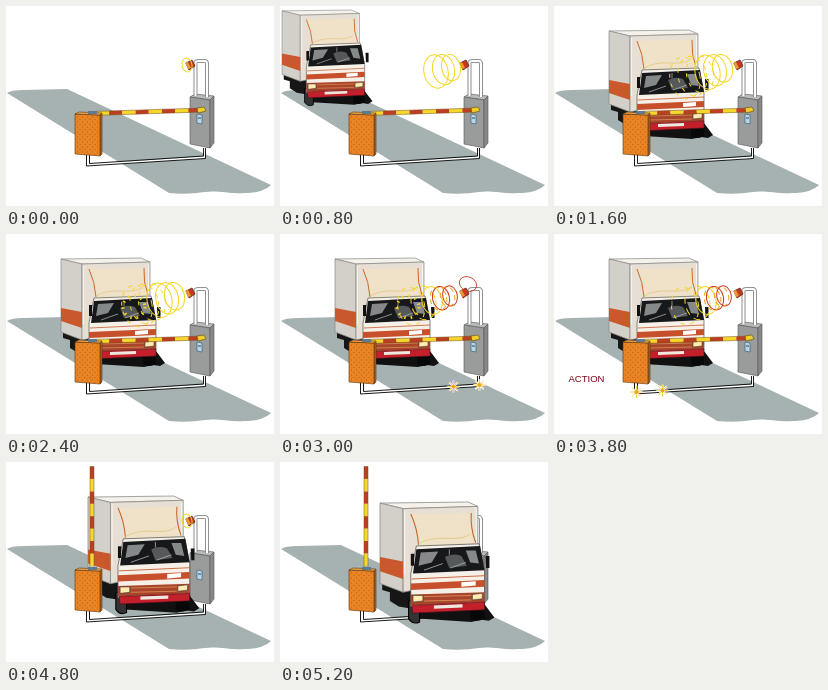
Recreate the animation shown at these times as an HTML page. Size 268 by 200 pixels, loop 5.4 s.

```html
<!DOCTYPE html>
<html lang="en">
<head>
<meta charset="utf-8">
<title>Vehicle barrier</title>
<style>
  html, body { margin: 0; width: 100%; height: 100%; overflow: hidden; background: #fff; }
  svg { display: block; width: 100vw; height: 100vh; }
  text { font-family: "Liberation Sans", Arial, sans-serif; }
</style>
</head>
<body>
<svg viewBox="0 0 268 200">
  <defs>
    <pattern id="speckle" width="5" height="5" patternUnits="userSpaceOnUse">
      <rect width="5" height="5" fill="#e88424"/>
      <path d="M1 1h1M3.5 3.5h1" stroke="#b85c18"/>
    </pattern>
  </defs>

  <path fill="#a6b1b1" d="M1 87Q5 84 18 84L61 83 265 179Q258 186 242 187C222 188 211 184 199 186Q181 189 163 187Z"/>

  <g fill="none" stroke="#000" stroke-width=".9">
    <path stroke="#fff" stroke-width="2" d="M82 148V159L198.500 151.500V142"/>
    <path d="M80.500 148V160L199.500 152.500V142M83.500 148V157.500L197.500 150V142"/>
  </g>

  <g id="station">
    <path fill="#b9bbba" stroke="#555" stroke-width=".6" d="M184 91L189 88 208 90 204 94Z"/>
    <path fill="#999c9b" stroke="#555" stroke-width=".6" d="M184 91L204 94V142L184 138Z"/>
    <path fill="#868988" stroke="#555" stroke-width=".6" d="M204 94L208 90V137L204 142Z"/>
    <path fill="#b8d8e8" stroke="#46647c" stroke-width=".7" d="M191 108L196 109V118L191 117Z"/>
    <path stroke="#284878" d="M192 112h3"/>
    <path id="post" fill="none" stroke="#8a8e90" stroke-width="3.600" d="M189.500 90V56Q190 55 192 55H199Q201 55 201 58V91"/>
    <use href="#post" style="stroke:#fff"/>
    <path fill="none" stroke="#fff" stroke-width="2" d="M189.500 90V56Q190 55 192 55H199Q201 55 201 58V91"/>
    <path fill="#c83a20" stroke="#5c2014" stroke-width=".8" d="M180 57L186 54 189 60 183 64Z"/>
    <path fill="#e59a3a" d="M179 57L182 56 185 62 182 63Z"/>
  </g>

  <g id="truck">
    <!-- ground shadow and wheels -->
    <path fill="#111" d="M84 119L150 117 159 129 154 132 147 131 138 133 90 130Z"/>
    <path fill="#161616" d="M57 96L84 101V121L72 119 64 114V106L57 104Z"/>
    <path fill="#333" stroke="#000" d="M81 114H91V133Q85 136 81 130Z"/>
    <path fill="#080808" d="M137 115H150V130Q143 134 137 130Z"/>
    <!-- cargo box -->
    <path fill="#f5f2eb" stroke="#888" stroke-width=".7" d="M55 25L135 24 144 28 76 30Z"/>
    <path fill="#d3d0ca" stroke="#888" stroke-width=".7" d="M55 25L76 30V106L55 98Z"/>
    <path fill="#e7dfd3" stroke="#888" stroke-width=".7" d="M76 30L144 28V92L76 106Z"/>
    <path fill="none" stroke="#f6f4ef" d="M77.500 32V90M142.500 30V64"/>
    <path fill="#c9582d" d="M55 74L76 78V94L55 87Z"/>
    <!-- wind deflector -->
    <path fill="#efe2c8" d="M83 35Q89 48 90 64L142 62Q137 48 138 34Z"/>
    <path fill="none" stroke="#c9682c" d="M83 35Q89 48 90 63M138 34Q137 48 142 61"/>
    <path fill="none" stroke="#e2c47a" stroke-width=".7" d="M90 62Q100 56 116 57T137 53"/>
    <!-- cab -->
    <path fill="#f5f1e9" stroke="#555" stroke-width=".7" d="M88 64L145 62 150 87V116L83 119V89Z"/>
    <path fill="#17181a" d="M88 67L146 64 150 86 85 89Z"/>
    <path fill="#85898a" d="M92 70L108 69 102 79 90 82ZM133 68L142 68 145 80 137 79Z"/>
    <path fill="#55595b" d="M114 74Q121 70 129 73L134 82 118 84Z"/>
    <path fill="none" stroke="#b9bbb8" stroke-width=".7" d="M95 86L112 80M119 84L133 79M118 67V72"/>
    <path fill="#111" d="M83 71H86V82H83ZM151 73H154.500V84H151.500Z"/>
    <path stroke="#c9582d" stroke-width=".8" d="M84 94L150 91"/>
    <path fill="#c84f2b" d="M83 98L150 95V101L83 104Z"/>
    <path fill="#fff" d="M129 97L142 96V100L129 101Z"/>
    <path fill="#a8452a" d="M83 108L150 106V115L83 118Z"/>
    <path stroke="#e09a60" stroke-width=".7" d="M95 110L138 109M95 114L138 113"/>
    <path fill="#ffecb0" stroke="#444" stroke-width=".6" d="M85 109L94 109V114L85 115ZM139 108L148 107V112L139 113Z"/>
    <path fill="#c4202c" stroke="#501018" stroke-width=".6" d="M84 118L150 115V122L85 125Z"/>
    <path fill="#eee9df" d="M104 118L130 117V120L104 121Z"/>
  </g>

  <g id="arm"></g>
  <path id="holder" fill="#f0cf28" stroke="#604c10" stroke-width=".6" d="M191 102L198 101 200 105 192 107Z"/>

  <path fill="#b8641e" stroke="#5a3410" stroke-width=".6" d="M94 109L96 107V148L94 150Z"/>
  <path fill="url(#speckle)" stroke="#5a3410" stroke-width=".6" d="M69 108L94 109V150L69 148Z"/>
  <path fill="#efa54f" stroke="#5a3410" stroke-width=".6" d="M69 108L73 106 96 107 94 109Z"/>
  <path fill="#607a90" d="M82 105H91V108H82Z"/>

  <g id="signals" fill="none"></g>
  <text id="action" x="14.500" y="148.300" font-size="9.500" fill="#800018">ACTION</text>
</svg>

<script>
const STEP = 200, STEPS = 27;
const YELLOW = "#f6d624", RED = "#c8391e";
const el = id => document.getElementById(id);
const truck = el("truck"), arm = el("arm"), signals = el("signals");
const lerp = (a, b, u) => a + (b - a) * u;
const clamp = u => Math.max(0, Math.min(1, u));
const show = (node, on) => { node.style.display = on ? "" : "none"; };

// step, left, top, scale
const drive = [
  [4, 2, 4, .87],
  [6, 19, 10, .92],
  [8, 55, 24, 1],
  [22, 55, 24, 1],
  [24, 82, 34, 1.07],
  [26, 100, 40, 1.1]
];

arm.innerHTML = Array.from({ length: 8 }, (_, i) =>
  `<rect x="${4 + i * 13.2}" y="-2" width="13.200" height="4" fill="${i % 2 ? "#bd3e20" : "#f6d82a"}"/>`
).join("") + '<path fill="none" stroke="#76501c" stroke-width=".5" d="M0-2H109.600V2H0"/>';

function truckPose(step) {
  let i = 0;
  while (i < drive.length - 2 && step > drive[i + 1][0]) i++;
  const [a, b] = [drive[i], drive[i + 1]];
  const u = clamp((step - a[0]) / (b[0] - a[0]));
  return a.map((v, k) => lerp(v, b[k], u)).slice(1);
}

// u runs from the detector (0) to the windscreen (1)
function ring(u, color, size = 1, dash = "") {
  const x = 181 - 50 * u, y = 59 + 13 * u, grow = Math.sqrt(u);
  return `<ellipse cx="${x}" cy="${y}" rx="${(5 + 10 * grow) * size}" ry="${(7 + 14 * grow) * size}"
    stroke="${color}" stroke-dasharray="${dash}" transform="rotate(-12 ${x} ${y})"/>`;
}

function spark(x, y, r) {
  let rays = "";
  for (let i = 0; i < 8; i++) {
    const a = i * Math.PI / 4;
    rays += `M${x} ${y}l${r * Math.cos(a)} ${r * Math.sin(a)}`;
  }
  return `<path d="${rays}" stroke="#fff" stroke-width="1.800"/>
    <path d="${rays}" stroke="#f4c430" stroke-width=".8"/>
    <circle cx="${x}" cy="${y}" r="${r * .35}" fill="#f0a818"/>`;
}

function callWaves(step) {
  const front = Math.min(1, step / 8);
  let out = "";
  for (let u = front; u > .1; u -= .15)
    out += ring(u, YELLOW, 1, u > .62 ? "4 6" : "");
  return out;
}

function replyWaves(step) {
  let out = ring(1, YELLOW, .9, "4 6") + ring(.75, YELLOW, .9, "7 5") + ring(.58, YELLOW, .8);
  const front = .4 - (step + 1) % 4 * .07;
  for (const u of [front, front - .18])
    if (u >= 0) out += ring(u, RED, .75) + ring(u + .05, "#f0a020", .7, "5 4");
  return out;
}

function drawSignals(step) {
  let out = "";
  if (step === 0 || step === 23 || step === 24) out += ring(0, YELLOW);
  else if (step < 13) out += callWaves(step);
  else if (step < 23) out += replyWaves(step);

  if (step >= 12 && step <= 17)
    out += `<circle cx="128" cy="73" r="11" stroke="${YELLOW}" stroke-width="3" stroke-dasharray="1.500 5"/>`;
  if (step >= 14 && step <= 16)
    out += `<ellipse cx="188" cy="50" rx="9" ry="7" stroke="${RED}" stroke-width=".8" transform="rotate(25 188 50)"/>`;
  if (step >= 14 && step <= 19) {
    const head = Math.min(117, (step - 14) * 26);
    for (const run of [head, head - 26])
      if (run >= 0) out += spark(199.5 - run, 151 + run * .06, 6);
  }
  signals.innerHTML = out;
}

function draw(step) {
  const [x, y, scale] = truckPose(step);
  truck.setAttribute("transform", `translate(${x} ${y}) scale(${scale}) translate(-55 -24)`);
  show(truck, step >= 4);

  const lift = clamp((step - 19) / 3);
  arm.setAttribute("transform",
    `translate(86 107.500) rotate(${lerp(-1.8, -90, lift)}) scale(${lerp(1, .94, lift)} 1)`);
  show(el("holder"), !lift);
  show(el("action"), step >= 19 && step <= 23);
  drawSignals(step);
}

let shown = -1;
function tick(now) {
  const step = Math.floor(now / STEP) % STEPS;
  if (step !== shown) draw(shown = step);
  requestAnimationFrame(tick);
}
draw(shown = 0);
requestAnimationFrame(tick);
</script>
</body>
</html>
```
